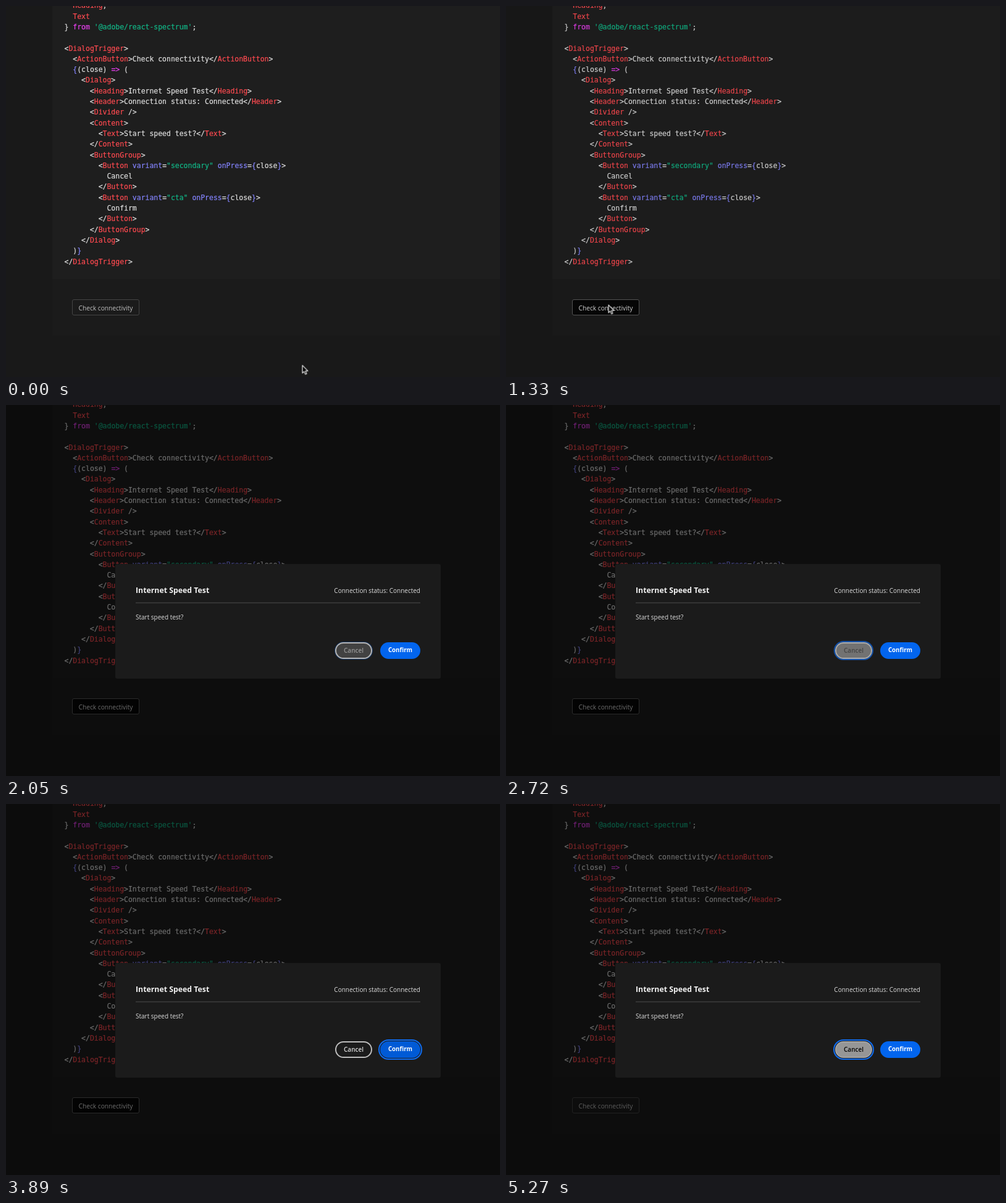
An HTML page for the animation above (5300 ms loop, 800 px wide and 602 px high).

```html
<!DOCTYPE html>
<html lang="en">
<head>
<meta charset="utf-8">
<title>Dialog focus demo</title>
<style>
  html, body { margin: 0; width: 100%; height: 100%; overflow: hidden; background: #191919; }
  #stage { position: relative; width: 800px; height: 602px; overflow: hidden; font: 10px/20px "Open Sans", "Noto Sans", sans-serif; }
  #stage div, #stage svg, #code { position: absolute; box-sizing: border-box; white-space: pre; }
  .panel { left: 75px; width: 725px; }
  #code { margin: 0; left: 94.5px; top: -8.6px; font: 11.46px/17.3px "DejaVu Sans Mono", monospace; color: #dedede; -webkit-text-stroke: .2px; }
  .tag { color: #ff4a50; }
  .key { color: #e840f0; }
  .str { color: #12b888; }
  .att { color: #8484ff; }
  #trigger { left: 107px; top: 476px; width: 109px; height: 26px; border: 1px solid; border-radius: 3px; font-size: 10.2px; line-height: 26px; text-align: center; }
  #shade { inset: 0; background: #000; }
  #dialog { left: 177px; top: 258px; width: 527px; height: 186px; border-radius: 3px; background: #1b1b1b; color: #dcdcdc; }
  #title { left: 33px; top: 33px; font-size: 12.3px; font-weight: 700; color: #f2f2f2; }
  #status { right: 33px; top: 33px; }
  #rule { left: 33px; top: 62px; width: 461px; height: 2px; background: #343434; }
  #question { left: 33px; top: 76px; }
  .pill { top: 127px; height: 27px; border-radius: 14px; text-align: center; }
  #cancel { left: 356px; width: 60px; border: 2px solid; font-weight: 600; line-height: 22px; }
  #confirm { left: 429px; width: 65px; color: #fff; font-size: 9.7px; font-weight: 700; line-height: 26px; }
  .ring { left: 0; top: 0; border: 2px solid #0f6df2; border-radius: 18px; }
</style>
</head>
<body>
<div id="stage">
  <div class="panel" style="top:0;height:443px;background:#1e1e1e"></div>
  <div class="panel" style="top:443px;height:92px;background:#1b1b1b"></div>
  <pre id="code"></pre>
  <div id="trigger">Check connectivity</div>
  <div id="shade"></div>
  <div id="dialog">
    <div id="title">Internet Speed Test</div>
    <div id="status">Connection status: Connected</div>
    <div id="rule"></div>
    <div id="question">Start speed test?</div>
    <div class="ring" id="cancelRing"></div>
    <div class="pill" id="cancel">Cancel</div>
    <div class="ring" id="confirmRing"></div>
    <div class="pill" id="confirm">Confirm</div>
  </div>
  <svg id="cursor" style="left:-2px;top:-2px" width="16" height="20" viewBox="-2 -2 16 20">
    <path d="M.5.7V13.2L3.3 10.6 5.3 15.1 7.4 14.2 5.4 9.7H9.3Z" fill="#080808" stroke="#fff" stroke-width="1.1" stroke-linejoin="round"/>
  </svg>
</div>
<script>
const LOOP = 5300;
const $ = id => document.getElementById(id);

const source = `  Heading,
  Text
} from '@adobe/react-spectrum';

<DialogTrigger>
  <ActionButton>Check connectivity</ActionButton>
  {(close) => (
    <Dialog>
      <Heading>Internet Speed Test</Heading>
      <Header>Connection status: Connected</Header>
      <Divider />
      <Content>
        <Text>Start speed test?</Text>
      </Content>
      <ButtonGroup>
        <Button variant="secondary" onPress={close}>
          Cancel
        </Button>
        <Button variant="cta" onPress={close}>
          Confirm
        </Button>
      </ButtonGroup>
    </Dialog>
  )}
</DialogTrigger>`;

// Syntax colouring: one named group per token class
const token = /(?<str>"[^"]*"|'[^']*')|(?<key>\bfrom\b|=>)|(?<tag>(?<=<\/?|^ {2})\w+)|(?<att>\w+(?==)|(?<!^)[{}])/gm;

function paintCode(pre) {
  let last = 0;
  for (const m of source.matchAll(token)) {
    const span = document.createElement('span');
    span.className = Object.keys(m.groups).find(k => m.groups[k]);
    span.textContent = m[0];
    pre.append(source.slice(last, m.index), span);
    last = m.index + m[0].length;
  }
  pre.append(source.slice(last));
}

// steps: [ms, properties, easing to the next step]
function play(id, steps) {
  const [first, end] = [steps[0], steps[steps.length - 1]];
  const all = [[0, first[1]], ...steps, [LOOP, end[1]]];
  $(id).animate(
    all.map(([ms, props, easing = 'linear']) => ({ ...props, offset: ms / LOOP, easing })),
    { duration: LOOP, iterations: Infinity });
}

// Fades between two looks at each toggle time, starting from "off"
function toggle(id, times, off, on, easeIn = 130, easeOut = 80) {
  const steps = times.flatMap((t, i) => {
    const [from, to, span] = i % 2 ? [on, off, easeOut] : [off, on, easeIn];
    return [[t, from, 'ease-in-out'], [t + span, to]];
  });
  play(id, steps);
}

const box = (x, y, w, h, grow, opacity) => ({
  transform: `translate(${x - grow}px, ${y - grow}px)`,
  width: `${w + 2 * grow}px`,
  height: `${h + 2 * grow}px`,
  opacity
});

const at = (x, y) => ({ transform: `translate(${x}px, ${y}px)` });

paintCode($('code'));

toggle('trigger', [450, 4370],
  { backgroundColor: '#1b1b1b', borderColor: '#454545', color: '#c0c0c0' },
  { backgroundColor: '#060606', borderColor: '#5a5a5a', color: '#e4e4e4' }, 130, 130);

play('shade', [
  [1250, { opacity: 0 }, 'cubic-bezier(.4,0,.6,1)'],
  [1550, { opacity: .52 }]
]);

play('dialog', [
  [1421, { opacity: 0, ...at(0, 20) }, 'cubic-bezier(0,0,.4,1)'],
  [1671, { opacity: 1, ...at(0, 0) }]
]);

// Tab presses move the focus between the two buttons
const tabs = [2000, 2330, 2640, 2960, 3270, 3640, 3980];

toggle('cancel', tabs,
  { backgroundColor: '#1b1b1b', borderColor: '#bcbcbc', color: '#dcdcdc' },
  { backgroundColor: '#969696', borderColor: '#a4a4a4', color: '#050505' });
toggle('cancelRing', tabs, box(356, 127, 60, 27, 0, 0), box(356, 127, 60, 27, 3, 1));
toggle('confirm', tabs.slice(1), { backgroundColor: '#0265ee' }, { backgroundColor: '#005ad6' });
toggle('confirmRing', tabs.slice(1), box(429, 127, 65, 27, 0, 0), box(429, 127, 65, 27, 3, 1));

const shown = { opacity: 1 }, hidden = { opacity: 0 };
const start = at(479.5, 582.5), button = at(165.5, 484.5), rest = at(180, 446.5);

play('cursor', [
  [30, { ...start, ...shown }, 'cubic-bezier(.4,0,.4,1)'],
  [620, { ...button, ...shown }],
  [2000, { ...button, ...shown }],
  [2000, { ...button, ...hidden }],
  [4300, { ...rest, ...hidden }],
  [4300, { ...rest, ...shown }],
  [4430, { ...rest, ...shown }],
  [4430, { ...rest, ...hidden }]
]);
</script>
</body>
</html>
```
